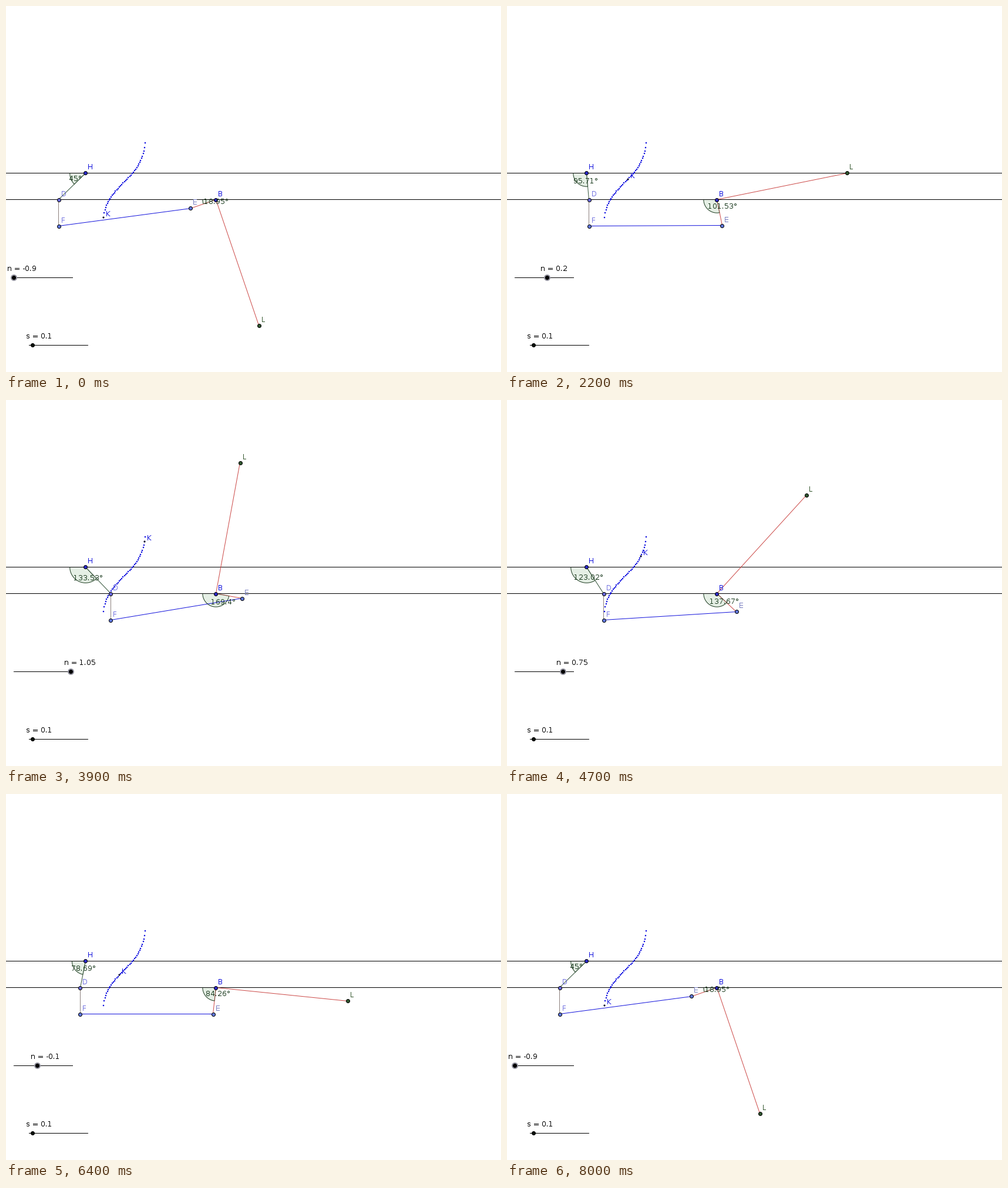
Recreate the animation shown at these times as a matplotlib script. Size 843 by 623 pixels, loop 8100 ms.

```python
import math

import matplotlib.pyplot as plt
import numpy as np
from matplotlib.animation import FuncAnimation
from matplotlib.patches import Circle

WIDTH, HEIGHT, DPI = 843, 623, 64
PX = 72 / DPI                      # one pixel in points
UNIT, X0, Y0 = 45.3, 130.58, 374.9  # plane units to pixels
STEPS = 40

plt.rcParams.update({
    "font.family": "DejaVu Sans",
    "font.size": 12 * PX,
    "text.hinting": "native",
    "text.hinting_factor": 1,
    "path.snap": False,
    "toolbar": "None",
})

BLUE = "#1414dc"
PALE = "#7474e0"
GREEN = "#1c3c20"
RED = "#cc4a48"

H = np.array([0.1, 2.0])
B = np.array([5.0, 1.0])


def to_px(p):
    return X0 + UNIT * p[0], Y0 - UNIT * p[1]


def pixel_centre(p):
    """Line ends sit on the centre of the pixel they fall in."""
    x, y = to_px(p)
    return math.floor(x) + 0.5, math.floor(y) + 0.5


def nearest(p):
    x, y = to_px(p)
    return round(x), round(y)


def slider_value(i):
    return round(-0.9 + 0.05 * min(i, 2 * STEPS - i), 2)


def angle_below(vertex, p):
    """Angle from the leftward ray, turning through straight down."""
    return math.atan2(vertex[1] - p[1], vertex[0] - p[0])


def linkage(n):
    D, F = np.array([n, 1.0]), np.array([n, 0.0])
    d = B - F
    dist = math.hypot(*d)
    d = d / dist
    along = (dist ** 2 + 24) / (2 * dist)
    off = math.sqrt(25 - along ** 2)
    E = F + along * d + off * np.array([d[1], -d[0]])
    arm = E - B
    L = B + 5 * np.array([-arm[1], arm[0]])
    alpha, beta = angle_below(H, D), angle_below(B, E)
    K = np.array([alpha, beta])
    return dict(H=H, B=B, D=D, F=F, E=E, L=L, K=K), alpha, beta


def number(v):
    return f"{v:.2f}".rstrip("0").rstrip(".")


fig = plt.figure(figsize=(WIDTH / DPI, HEIGHT / DPI), dpi=DPI, facecolor="white")
ax = fig.add_axes([0, 0, 1, 1])
ax.set_xlim(0, WIDTH)
ax.set_ylim(HEIGHT, 0)
ax.axis("off")


def line(xs, ys, color, z=2):
    return ax.plot(xs, ys, color=color, lw=PX, zorder=z,
                   solid_capstyle="butt")[0]


def dot(x, y, radius, fill, edge=1, z=5):
    return ax.add_patch(Circle((x, y), radius, fc=fill, lw=edge * PX, zorder=z,
                               ec="black" if edge else "none"))


def label(x, y, text, color):
    return ax.text(x, y, text, color=color, ha="left", va="baseline", zorder=6)


class AngleMark:
    def __init__(self, vertex, shift):
        self.vertex, self.shift = vertex, shift
        self.fill = ax.fill([0], [0], color="#006400", alpha=0.1, lw=0, zorder=1)[0]
        self.leg = line([], [], GREEN, 3)
        self.leg.set_alpha(0.5)
        self.arc = line([], [], GREEN, 3)
        self.text = label(0, 0, "", GREEN)

    def update(self, p, angle):
        x, y = pixel_centre(self.vertex)
        r = min(26.8, UNIT * math.hypot(*(p - self.vertex)) / 2)
        t = np.linspace(0, angle, 60)
        xs, ys = x - r * np.cos(t), y + r * np.sin(t)
        self.fill.set_xy(np.column_stack([np.r_[x, xs], np.r_[y, ys]]))
        self.leg.set_data([x, xs[-1]], [y, ys[-1]])
        self.arc.set_data(xs, ys)
        tx = x - r / 1.7 * math.cos(angle / 2) + self.shift[0]
        ty = y + r / 1.7 * math.sin(angle / 2) + self.shift[1]
        self.text.set_position((round(tx), round(ty)))
        self.text.set_text(number(math.degrees(angle)) + "°")


# Fixed parts
for row in (284.5, 329.5):
    line([0, WIDTH], [row, row], "black")
line([13, 114], [462.5, 462.5], "black")
line([39, 140], [577.5, 577.5], "black")
dot(45.5, 577.5, 3, "#061006")
label(34, 566, "s = 0.1", "black")

for i in range(STEPS + 1):
    dot(*nearest(linkage(slider_value(i))[0]["K"]), 1.25, "#0a0ae0", 0, 4)

# Moving parts
SEGMENTS = {"HD": "#34543a", "DF": "#8c807e", "FE": BLUE, "BE": RED, "BL": RED}
segments = {key: line([], [], color) for key, color in SEGMENTS.items()}

FILLS = {"H": "#2a2ac8", "B": "#2e2ac8", "D": "#6a6ae0", "F": "#6078e0",
         "E": "#6078dc", "L": "#30562f"}
INKS = {"H": BLUE, "B": BLUE, "K": BLUE, "D": PALE, "F": PALE,
        "E": "#7a80c0", "L": "#36582f"}
dots = {key: dot(0, 0, 3, fill) for key, fill in FILLS.items()}
dots["K"] = dot(0, 0, 1.5, "#000020", 0)
names = {key: label(0, 0, key, ink) for key, ink in INKS.items()}

marks = [AngleMark(H, (-14, 7.7)), AngleMark(B, (-7.3, 5.2))]
halo = dot(0, 462.5, 5.5, "#9494a0", 0)
knob = dot(0, 462.5, 3, "black")
n_text = label(0, 451, "", "black")


def update(i):
    n = slider_value(i)
    pts, alpha, beta = linkage(n)
    for (a, b), seg in segments.items():
        (xa, ya), (xb, yb) = pixel_centre(pts[a]), pixel_centre(pts[b])
        seg.set_data([xa, xb], [ya, yb])
    for key, p in pts.items():
        x, y = nearest(p)
        small = key == "K"
        dots[key].center = (x, y) if small else (x + 0.5, y + 0.5)
        names[key].set_position((x + 4, y - (2 if small else 6)))
    marks[0].update(pts["D"], alpha)
    marks[1].update(pts["E"], beta)
    x = 13 + math.floor(50 * (n + 0.9) + 0.01)
    halo.center = knob.center = (x + 0.5, 462.5)
    n_text.set_position((x - 11, 451))
    n_text.set_text("n = " + number(n))
    return []


anim = FuncAnimation(fig, update, frames=2 * STEPS + 1, interval=100,
                     repeat=True, repeat_delay=0, blit=False)
plt.show()
```
